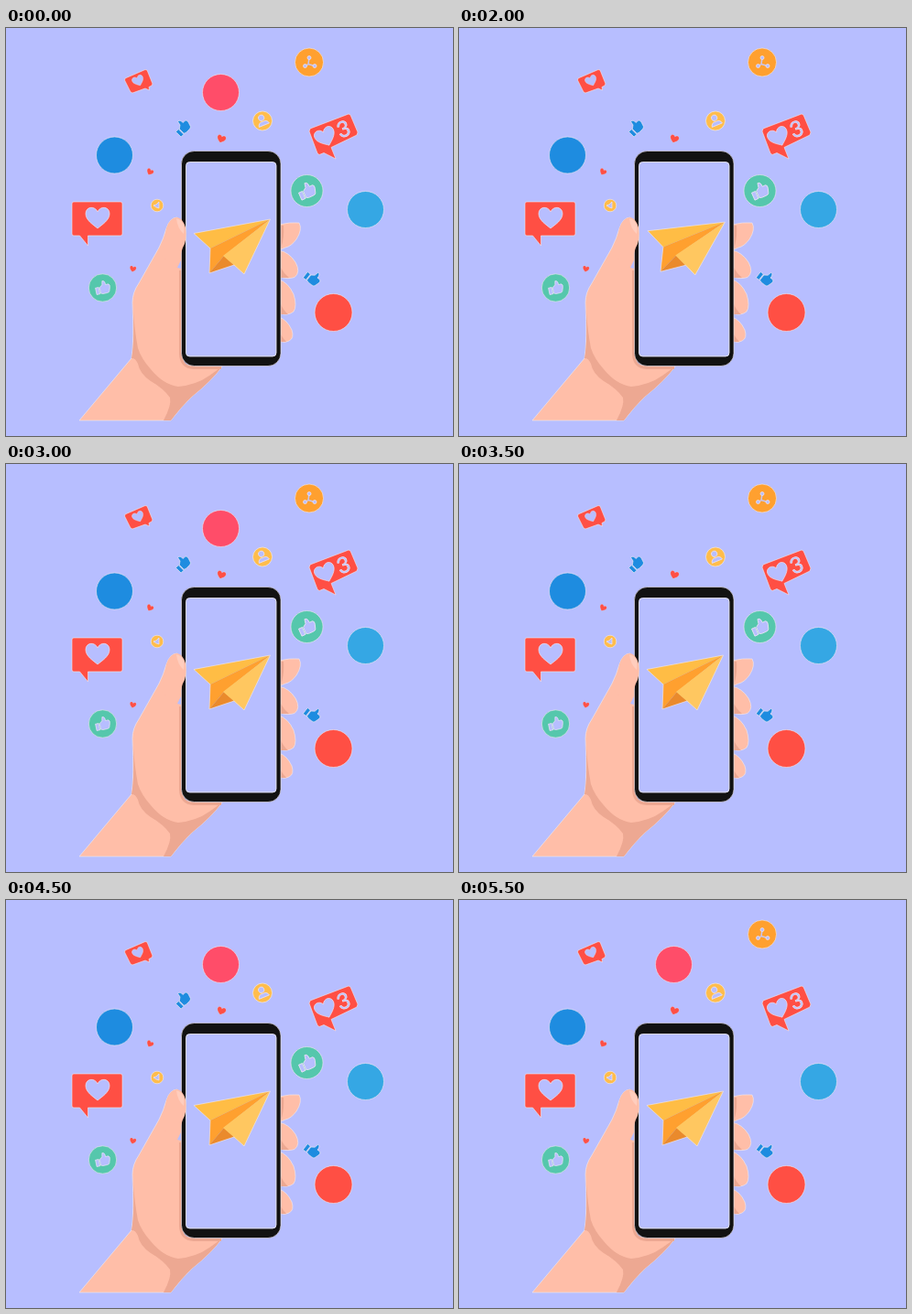
These frames come from a looping animation (488 by 446 pixels, 6 s). An HTML page:

```html
<!DOCTYPE html>
<html lang="en">
<head>
<meta charset="utf-8">
<title>Phone and reactions</title>
<style>
html, body { margin: 0; width: 100%; height: 100%; overflow: hidden; background: #b7beff; }
svg { display: block; width: 100%; height: 100%; }
.hole { fill: #b7beff; stroke: #efe6f6; stroke-width: .7; }
.red { fill: #ff4f44; }
.blue { fill: #1e8ce0; }
.green { fill: #55c7ac; }
.rim { stroke: #f1eaf0; stroke-width: .6; }
.skin { fill: #ffbea8; }
.shade { fill: #eda892; }
</style>
</head>
<body>
<svg viewBox="0 0 488 446">
  <defs>
    <path id="heart" d="M0 11C-5 7-13 2-13-5C-13-13-3-14 0-7C3-14 13-13 13-5C13 2 5 7 0 11Z"/>
    <path id="thumb" d="M-8.500-1.500h4v8h-4zM-3.500-1L0-3.500L1-8Q4.500-8 4-3H7.500Q9.500-2 8.500 1L7 5.500Q6.500 7 4 7H-1L-3.500 6Z"/>
  </defs>

  <!-- fingers -->
  <g class="skin rim">
    <path d="M298 215Q310 212 320 213Q324 220 317 231Q311 239 305 240L298 243Z"/>
    <path d="M298 243Q309 245 316 256Q322 267 315 272.500Q308 275 298 272Z"/>
    <path d="M298 275Q308 278 314 291Q318 304 314 310Q308 315 298 312Z"/>
    <path d="M298 316Q307 319 312 330Q315 339 309 342Q304 345 298 342Z"/>
  </g>
  <path class="shade" d="M300 216h3q1 14-3 25zM300 262q3 6 9 11h-9zM300 302q3 7 8 11h-8zM300 335q3 5 6 8h-6z"/>

  <!-- arm and palm -->
  <path class="skin rim" d="M80 429L137 361Q140 342 138 300Q138 289 145 279L167 240Q172 230 175 219Q179 207 187 207L194 216V368L236 370Q224 386 204 402Q192 413 180 429Z"/>
  <path class="shade" d="M138 297Q140 330 144 350Q148 362 158 373Q172 390 188 392Q208 390 222 380L236 370Q224 386 204 402Q192 413 180 429H172Q181 412 179 404Q172 394 158 386Q146 378 144 367Q141 360 137 361Q141 340 138 297Z"/>
  <path d="M190.500 265V356Q191 371 205 371.500H235" fill="none" stroke="#eda892" stroke-width="3"/>

  <!-- phone -->
  <rect class="rim" x="191.500" y="134.500" width="108.500" height="235" rx="14" fill="#121212"/>
  <rect x="196.500" y="146.500" width="98.500" height="212.500" rx="4" fill="#b7beff" stroke="#f4f2ff" stroke-width=".8"/>
  <path class="skin" d="M175 219Q179 207 187 207Q193 208 196 218Q198 232 193 240Q190 248 188 263L170 250Z"/>
  <path d="M186 208Q192 209 194 216Q195 221 194 225Q187 219 186 208Z" fill="#ffcdbd"/>
  <path d="M191 254V263L187 262Z" fill="#b7beff"/>

  <g id="plane">
    <path d="M288.500 209L205 224.500L223 241Z" fill="#ffbd45"/>
    <path d="M288.500 209L223 241L222 268L238 249Z" fill="#ffa02f"/>
    <path d="M222 268L238 249L249 259Z" fill="#ea8a2c"/>
    <path d="M288.500 209L260 269L237 249Z" fill="#ffc760"/>
    <path class="rim" d="M288.500 209L205 224.500L223 241L222 268L249 259L260 269Z" fill="none"/>
  </g>

  <!-- data-off: half-second steps in which a part is absent -->
  <circle data-off="2" class="blue rim" cx="118.500" cy="139" r="20"/>
  <circle data-off="4 7" class="rim" cx="234.500" cy="70.500" r="20" fill="#ff4d69"/>
  <circle class="rim" cx="392.500" cy="198.500" r="20" fill="#35a7e4"/>
  <circle class="red rim" cx="357.500" cy="311" r="20.500"/>

  <g data-off="9" transform="translate(331 37.500)">
    <circle class="rim" r="15.500" fill="#ffa02f"/>
    <path d="M0-5L-1 2L-4 4M-1 2L6 4" fill="none" stroke="#c9c5ed" stroke-width="1.500"/>
    <g class="hole"><circle cy="-5" r="2"/><circle cx="-4.500" cy="4" r="2"/><circle cx="6" cy="4" r="2"/></g>
  </g>
  <g transform="translate(280 101.500) rotate(-22)">
    <circle class="rim" r="10.500" fill="#ffbd4c"/>
    <g class="hole"><circle cy="-3.500" r="3.200"/><path d="M-6 5Q-5 0 0 1Q5 0 6 5Z"/></g>
  </g>
  <g transform="translate(165 194)">
    <circle class="rim" r="6.800" fill="#ffbd4c"/>
    <path class="hole" d="M-4 0L-1-1L2-4L2 3L-1 2Z"/>
  </g>

  <g data-off="11" transform="translate(328.500 178)">
    <circle class="green rim" r="17.500"/>
    <use href="#thumb" class="hole" transform="rotate(-24) scale(1.080)"/>
  </g>
  <g transform="translate(105.500 284)">
    <circle class="green rim" r="15.200"/>
    <use href="#thumb" class="hole" transform="rotate(-12) scale(.92)"/>
  </g>
  <use data-off="11" href="#thumb" class="blue rim" transform="translate(192.500 108.500) rotate(-45)"/>
  <use href="#thumb" class="blue rim" transform="translate(335 273) rotate(38)"/>

  <g class="red rim">
    <path d="M74 190H125Q127 190 127 192V225Q127 227 125 227H89.500V238L80.500 227H74Q72 227 72 225V192Q72 190 74 190Z"/>
    <path d="M130 55L152 45.500L154 46L160 61L159 63L156 64.500L156.500 68L152 66L138 71L136 70L129.500 57Z"/>
    <use href="#heart" transform="translate(235 121.500) rotate(18) scale(.37)"/>
    <use href="#heart" transform="translate(157 157.500) rotate(30) scale(.29)"/>
    <use href="#heart" transform="translate(138.500 263.500) rotate(12) scale(.27)"/>
  </g>
  <use href="#heart" class="hole" transform="translate(100 208)"/>
  <use href="#heart" class="hole" transform="translate(144.500 58) rotate(-24) scale(.48)"/>
  <g data-off="5">
    <path class="red rim" d="M332 110L374 94L376 95L384 114L383 117L355 130.500L360 143L347 136.500L342 138.500L340 137L331 113Z"/>
    <use href="#heart" class="hole" transform="translate(349 119.500) rotate(-24) scale(.86)"/>
    <text class="hole" transform="translate(368.500 110.500) rotate(-20)" y="8.500" text-anchor="middle" font-family="Lato, sans-serif" font-size="24">3</text>
  </g>
</svg>
<script>
const plane = document.getElementById('plane');
const blinkers = [...document.querySelectorAll('[data-off]')].map(el => ({
  el, off: el.dataset.off.split(' ').map(Number)
}));

function draw() {
  const step = Math.floor(performance.now() % 6000 / 500);
  for (const { el, off } of blinkers) {
    el.style.visibility = off.includes(step) ? 'hidden' : 'visible';
  }
  plane.setAttribute('transform', `rotate(${step === 4 ? 4 : 0} 245 238)`);
  requestAnimationFrame(draw);
}
draw();
</script>
</body>
</html>
```
